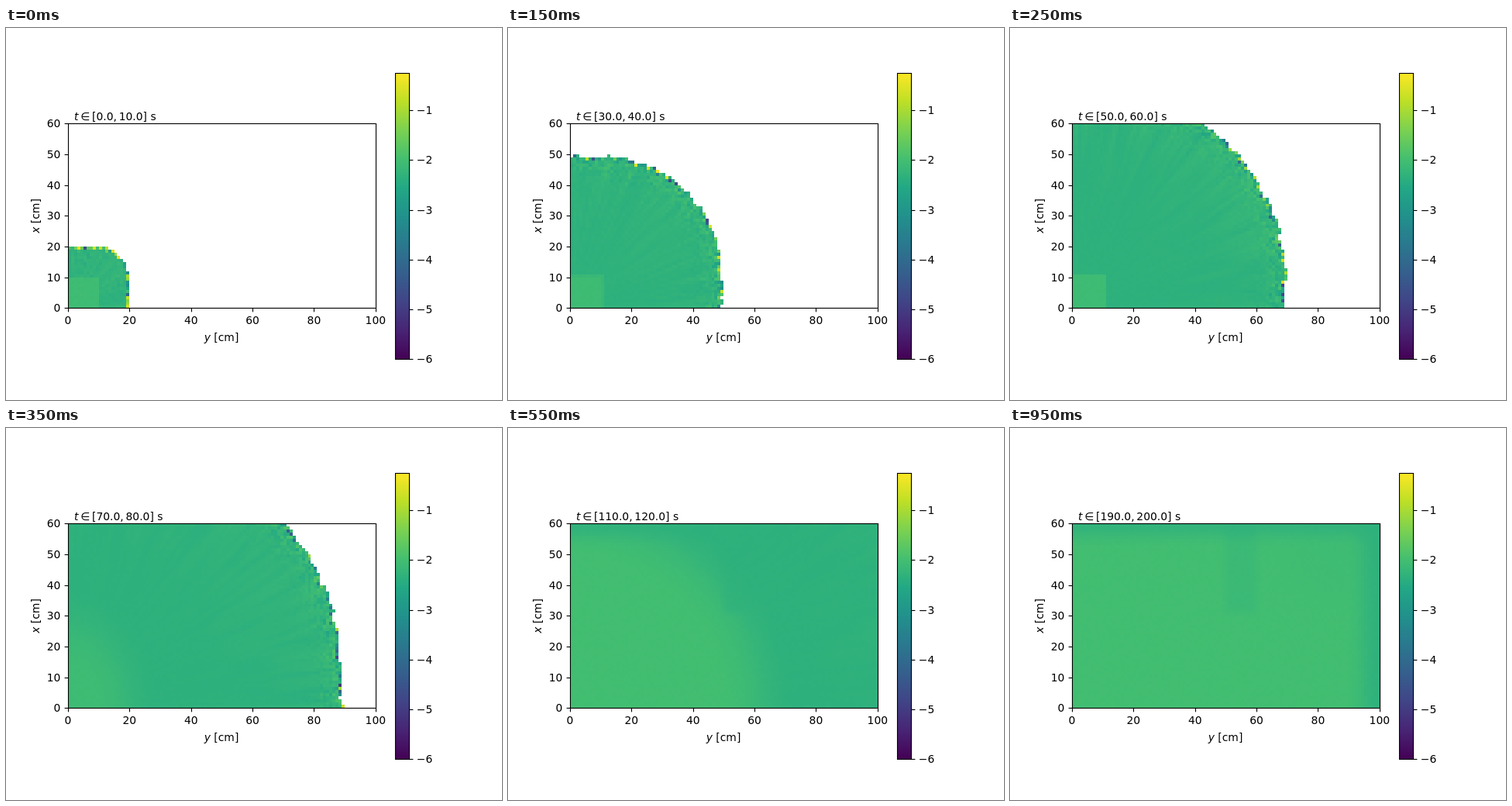
Animation of 640x480 px, one loop 1000 ms. Source, as an HTML page with a canvas:

```html
<!DOCTYPE html>
<html lang="en">
<head>
<meta charset="utf-8">
<title>Spreading front</title>
<style>
  html, body { margin: 0; width: 100%; height: 100%; overflow: hidden; background: #fff; }
  canvas { display: block; }
</style>
</head>
<body>
<canvas id="stage" width="640" height="480"></canvas>
<script>
const ctx = document.getElementById('stage').getContext('2d');

const LOOP = 1000, STEP = 50;
const COLS = 100, ROWS = 60, CELL = 3.968;
const LEFT = 80, TOP = 123.36, BOTTOM = 361.44;
const BAR = { left: 502, right: 520, top: 58, bottom: 427, unit: 64.2 };
const V_MIN = -6, V_SPAN = 5.757;
const FONT = '13.89px "DejaVu Sans", sans-serif';
const MATH = 'italic ' + FONT;

// Viridis, eleven even stops
const STOPS = ['440154', '482475', '414487', '355f8d', '2a788e', '21918c',
  '22a884', '44bf70', '7ad151', 'bddf26', 'fde725']
  .map(h => [0, 2, 4].map(i => parseInt(h.slice(i, i + 2), 16)));

const clamp = (v, lo = 0, hi = 1) => Math.min(hi, Math.max(lo, v));
const mix = (a, b, t) => a + (b - a) * t;
const smooth = t => { t = clamp(t); return t * t * (3 - 2 * t); };
const snap = v => Math.floor(v + 0.5) + 0.5;

function color(f) {
  const p = clamp(f) * 10, i = Math.min(9, Math.floor(p));
  const rgb = STOPS[i].map((c, n) => Math.round(mix(c, STOPS[i + 1][n], p - i)));
  return `rgb(${rgb})`;
}

function hash(a, b, c) {
  let h = Math.imul(a + 101, 374761393) ^ Math.imul(b + 57, 668265263) ^ Math.imul(c + 13, 1274126177);
  h = Math.imul(h ^ (h >>> 15), 2246822519);
  h = Math.imul(h ^ (h >>> 13), 3266489917);
  return ((h ^ (h >>> 16)) >>> 0) / 4294967296;
}

function noise(x, y, seed) {
  const i = Math.floor(x), j = Math.floor(y);
  const u = smooth(x - i), v = smooth(y - j);
  const row = n => mix(hash(i, n, seed), hash(i + 1, n, seed), u);
  return mix(row(j), row(j + 1), v) * 2 - 1;
}

// How far a point has risen from the early level to the late one, 0 to 1
function rise(y, x, k) {
  const source = 0.8 * smooth(10.5 - Math.max(x, y) + 0.2 * k) * (k < 7 ? 1 : 0);
  const reach = 22 + 9.8 * (k - 7);
  const d = k < 9 ? Math.hypot(y * 1.15, x * 0.85) : Math.hypot(y, x);
  const wave = smooth((reach - d) / 24 + 0.5) * clamp(0.8 + (k - 7) * 0.1, 0, 1);
  const roof = mix(0.2, 1, smooth((60 - x) / 8));
  const wall = mix(0.05, 1, smooth((100 - y) / 11));
  const block = smooth((y - 48) / 4) * smooth((62 - y) / 4) * smooth((x - 29) / 4);
  const shade = smooth((y - 58) / 30) * smooth((x - 25) / 30);
  const fade = clamp((k - 11) / 8);
  return Math.max(source, wave * roof * wall
    * (1 - block * mix(0.6, 0.36, fade))
    * (1 - shade * mix(0.35, 0.15, fade)));
}

// Log level of one cell, or null ahead of the front
function level(col, row, k) {
  const y = col + 0.5, x = row + 0.5;
  const radius = 10 * (k + 1);
  const dist = Math.hypot(Math.max(0, y - 10), Math.max(0, x - 10));
  const angle = Math.atan2(x, y), rho = Math.hypot(x, y);
  const ragged = clamp(radius / 50, 0.2, 1.6) * (0.5 + 0.5 * noise(angle * 28, 0, k));
  const depth = radius - dist - ragged * 1.2;
  if (depth < 0) return null;

  const u = hash(col, row, k);
  if (depth < 1) {
    const bright = clamp(0.38 - 0.035 * k, 0.12, 0.4);
    const w = hash(row, col, k + 40);
    if (u < bright) return -0.4 - 1.3 * w;
    if (u > 0.74) return -3 - 2.2 * w * w;
    return -1.8 - w;
  }
  const size = Math.min(1, radius / 40);
  const grain = (u + hash(col, row, k + 70) - 1) * (0.012 + 0.75 * size * Math.exp(-depth / 3.2));
  const rays = noise(angle * 42, rho / 15, 5) + 0.5 * noise(angle * 75, rho / 9, 9);
  const lit = rise(y, x, k);
  const streak = (rays * 0.11 + 0.07 * Math.sin(2 * angle)) * Math.exp(-depth / 24) * (1 - 0.8 * lit);
  return -2.34 + 0.06 * size * Math.exp(-depth / 10) + 0.33 * lit + streak + grain;
}

function drawField(k) {
  const edgeX = i => Math.round(LEFT + CELL * i);
  const edgeY = j => Math.round(BOTTOM - CELL * j);
  for (let row = 0; row < ROWS; row++) {
    for (let col = 0; col < COLS; col++) {
      const v = level(col, row, k);
      if (v === null) continue;
      const x = edgeX(col), y = edgeY(row + 1);
      ctx.fillStyle = color((v - V_MIN) / V_SPAN);
      ctx.fillRect(x, y, edgeX(col + 1) - x, edgeY(row) - y);
    }
  }
}

function line(x1, y1, x2, y2) {
  ctx.beginPath();
  ctx.moveTo(x1, y1);
  ctx.lineTo(x2, y2);
  ctx.stroke();
}

function text(s, x, y, align = 'left', font = FONT) {
  ctx.font = font;
  ctx.textAlign = align;
  ctx.fillText(s, x, y);
  return x + ctx.measureText(s).width;
}

function axisName(name, x, y) {
  text(' [cm]', text(name, x, y, 'left', MATH), y);
}

function drawAxes(k) {
  ctx.strokeStyle = ctx.fillStyle = '#000';
  ctx.lineWidth = 1.11;
  ctx.strokeRect(80.5, 123.5, 397, 238);
  for (let v = 0; v <= 100; v += 20) {
    const x = LEFT + CELL * v;
    line(snap(x), 361.5, snap(x), 366.4);
    text(v, x, 382, 'center');
  }
  for (let v = 0; v <= 60; v += 10) {
    const y = BOTTOM - CELL * v;
    line(75.6, snap(y), 80.5, snap(y));
    text(v, 70.3, Math.round(y + 5), 'right');
  }
  axisName('y', 255.7, 403.5);
  ctx.save();
  ctx.translate(42.5, 264.8);
  ctx.rotate(-Math.PI / 2);
  axisName('x', 0, 0);
  ctx.restore();

  const gap = 2.78, base = 119;
  let x = text('t', 87.94, base, 'left', MATH) + gap;
  x = text('∈', x, base) + gap;
  x = text(`[${(10 * k).toFixed(1)},`, x, base) + gap;
  text(`${(10 * k + 10).toFixed(1)}] s`, x, base);
}

function drawBar() {
  const { left, right, top, bottom, unit } = BAR;
  for (let y = top; y < bottom; y++) {
    ctx.fillStyle = color((bottom - y - 0.5) / (bottom - top));
    ctx.fillRect(left, y, right - left, 1);
  }
  ctx.fillStyle = '#000';
  ctx.strokeRect(left + 0.5, top + 0.5, right - left, bottom - top);
  for (let v = -6; v <= -1; v++) {
    const y = 427.2 - (v + 6) * unit;
    line(right + 0.5, snap(y), right + 5.4, snap(y));
    text('\u2212' + -v, 529.8, Math.round(y + 5));
  }
}

let shown = -1;
function update() {
  const k = Math.floor((performance.now() % LOOP) / STEP);
  if (k !== shown) {
    shown = k;
    ctx.fillStyle = '#fff';
    ctx.fillRect(0, 0, 640, 480);
    drawField(k);
    drawAxes(k);
    drawBar();
  }
  requestAnimationFrame(update);
}
update();
</script>
</body>
</html>
```
